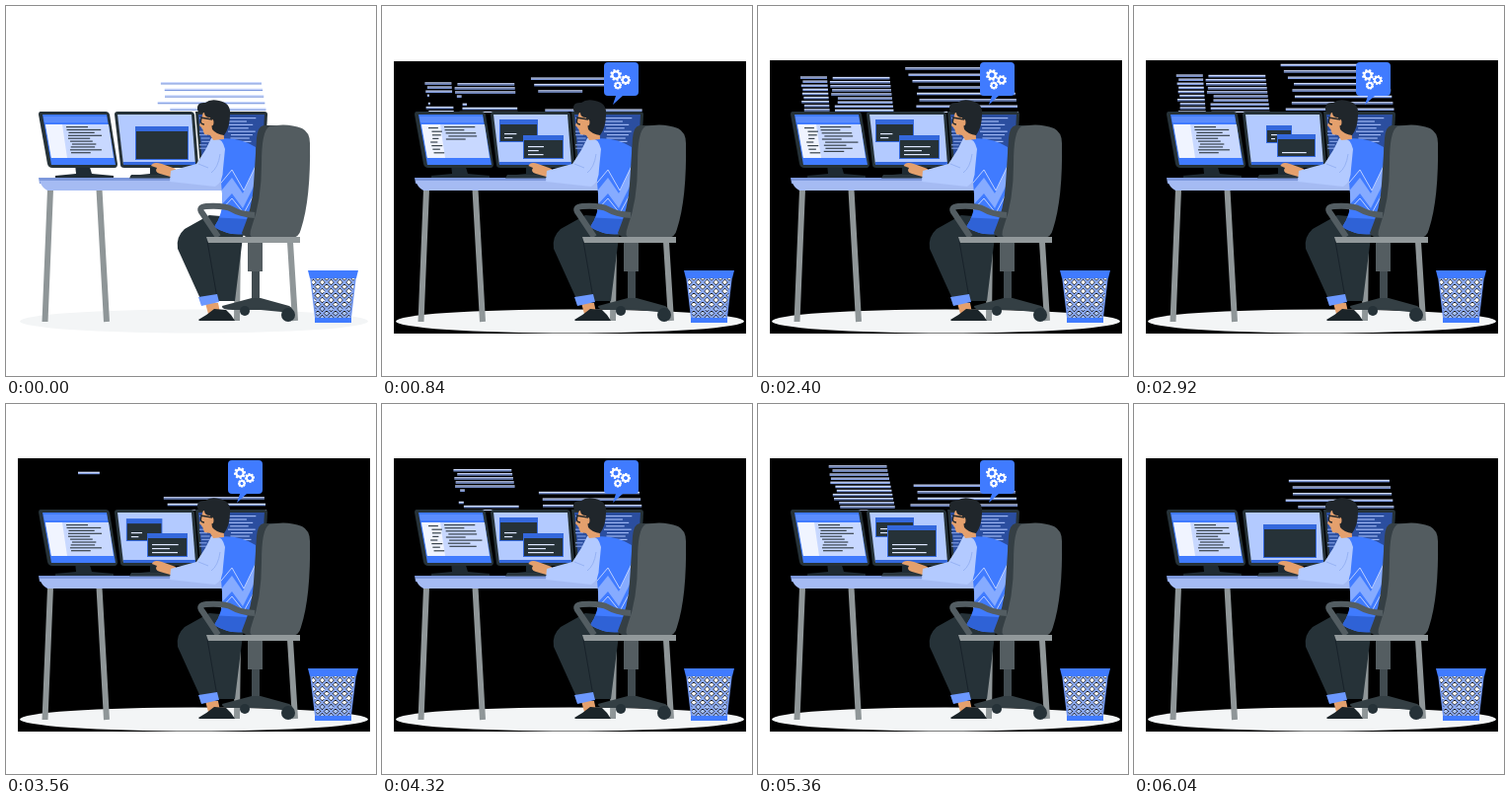
An HTML page with a canvas for the animation above (6.08 s loop, 375 by 375 pixels).

```html
<!DOCTYPE html>
<html lang="en">
<head>
<meta charset="utf-8">
<title>Programmer at a desk</title>
<style>
  html, body { margin: 0; width: 100%; height: 100%; overflow: hidden; background: #fff; }
  canvas { display: block; }
</style>
</head>
<body>
<canvas id="stage" width="375" height="375"></canvas>
<script>
const g = document.getElementById('stage').getContext('2d');
const LOOP = 6080, STEP = 40;
const BLUE = '#407bff', PALE = '#b3caff', DARK = '#263238', GREY = '#8f9698', SKIN = '#e4a06d';

const fill = (color, d) => { g.fillStyle = color; g.fill(new Path2D(d)); };
const line = (color, width, d) => {
  g.strokeStyle = color; g.lineWidth = width; g.stroke(new Path2D(d));
};
const box = (color, x, y, w, h) => { g.fillStyle = color; g.fillRect(x, y, w, h); };
const disc = (color, x, y, rx, ry = rx) => {
  g.fillStyle = color; g.beginPath(); g.ellipse(x, y, rx, ry, 0, 0, 7); g.fill();
};
const clamp = v => Math.max(0, Math.min(1, v));
const ease = v => { v = clamp(v); return v * v * (3 - 2 * v); };
const rnd = i => { const v = Math.sin(i * 12.9898 + 4) * 43758.5453; return v - Math.floor(v); };

// Eased interpolation through rows of [seconds, ...values]
function track(rows, t) {
  let i = 0;
  while (i < rows.length - 2 && t >= rows[i + 1][0]) i++;
  const [a, b] = [rows[i], rows[i + 1]];
  const k = ease((t - a[0]) / (b[0] - a[0]));
  return a.slice(1).map((v, j) => v + (b[j + 1] - v) * k);
}

function backdrop(t) {
  if (t < 0.04) return;
  const top = t < 0.64 ? 74 - 13 * t / 0.64 : t < 1.28 ? 56 : 55;
  box('#000', 12, top, 357, 332 - top);
}

// Rows rising from behind a monitor; they are typed from the top down and, half as fast, from row `low` up
function rising(x, w, top, gap, low, slant, seed, typed = 99) {
  g.save();
  g.beginPath(); g.rect(0, 0, 375, 108); g.clip();
  for (let i = 0, y = top; y < 108; i++, y += gap) {
    const grow = clamp(typed - Math.min(i, 2 * (low - 1 - i) + 1));
    const indent = w * 0.12 * rnd(seed + i);
    const len = (w - indent) * grow;
    if (len <= 0) continue;
    const left = x + (y - 60) * slant + indent;
    box('#cfdcff', left, y - 0.5, len, 1.3);
    box('#7f9be0', left, y + 0.8, len, 1.2);
  }
  g.restore();
}

function floatingCode(t) {
  const rise = 77.5 - 6.6 * t;
  if (t < 0.6) rising(146, 110, rise, 6.6, 5, 0.17, 3, 5 * (1 - ease((t - 0.2) / 0.4)));
  else if (t < 3.1) rising(146, 110, rise + 1, 6.4, 6, 0.17, 11, 1 + (t - 0.6) * 6);
  else rising(146, 110, 77 + 7 * (6.08 - t), 6.6, 6, 0.17, 3);
  if (t > 0.4 && t < 3.2) {
    const out = 1 - ease((t - 3) / 0.2);
    rising(41, 28 * out, 81 - 3.8 * t, 4.1, 7, 0.08, 21, (t - 0.4) * 7);
    rising(70, 62 * out, 82 - 4 * t, 4.1, 7, 0.12, 33, (t - 0.4) * 7);
  }
  if (t > 3.5 && t < 5.95) {
    const out = 1 - ease((t - 5.7) / 0.25);
    rising(69, 61 * out, 82 - 3.6 * t, 4.1, 11, 0.2, 47, (t - 3.5) * 6.2);
  }
}

function textRows(color, x, y, count, gap, w, seed, slant = 0) {
  for (let i = 0; i < count; i++) {
    box(color, x + i * gap * slant + (i % 4 ? 3 * rnd(seed + i) : 0), y + i * gap, w * (0.55 + 0.45 * rnd(seed + i + 9)), 1.2);
  }
}

function leftMonitor(t) {
  fill('#1f2b33', 'M70 160h14l3 10 22 2v3H50v-3l21-2z');
  fill(DARK, 'M35 107H101Q104 107 105 110L113 160Q113 164 110 164H47Q43 164 42 160L33 110Q33 107 35 107Z');
  fill(BLUE, 'M37 110H102L111 161H46Z');
  fill('#5b8dfc', 'M38 112H102L103 118H39Z');
  fill('#c8d8ff', 'M40 120H104L109 154H46Z');
  const wide = (t > 0.55 && t < 2.5) || (t > 3.6 && t < 5);
  fill('#f0f4ff', wide ? 'M40 120H59L64 154H46Z' : 'M40 120H57L62 154H46Z');
  if (wide) {
    textRows('#39444d', 47, 123, 8, 3.6, 11, 6, 0.15);
    const start = t < 3 ? 0.55 : 3.6;
    textRows('#39444d', 63, 122, Math.min(9, 4 + Math.floor((t - start) * 6)), 3.1, 34, 17, 0.15);
  } else {
    textRows('#39444d', 61, 122, 10, 2.9, 35, 60, 0.17);
  }
}

function codeWindow([x, y, w, h], rows, shown) {
  box('#3468dc', x, y, w, h);
  box(DARK, x + 1, y + 5, w - 2, h - 6);
  for (let i = 0; i < rows; i++) {
    box('#dfe8ff', x + 5, y + h - 5 - 4 * (rows - 1 - i), (w - 14) * (0.4 + 0.6 * rnd(i + 70)) * shown, 1.2);
  }
}

const BACK = [[0, 133, 123, 20, 16], [0.35, 133, 123, 20, 16], [0.75, 119, 115, 39, 23], [2.5, 119, 115, 39, 23],
  [2.88, 134, 121, 26, 18], [3.2, 134, 121, 26, 18], [3.7, 119, 115, 39, 24], [5, 119, 115, 39, 24],
  [5.5, 119, 115, 39, 19], [5.9, 134, 123, 20, 16], [6.08, 133, 123, 20, 16]];
const FRONT = [[0, 131, 122, 54, 34], [0.2, 131, 122, 54, 34], [0.7, 143, 131, 41, 24], [2.5, 143, 131, 41, 24],
  [2.9, 145, 130, 39, 23], [3.6, 143, 131, 41, 24], [4.9, 143, 131, 41, 24], [5.3, 131, 123, 50, 32],
  [5.7, 131, 123, 50, 32], [5.95, 131, 122, 54, 34], [6.08, 131, 122, 54, 34]];

function middleMonitor(t) {
  fill('#1f2b33', 'M146 160h18l2 10 12 2v3H126v-3l20-2z');
  fill(DARK, 'M113 107H187Q190 107 191 110L195 160Q195 164 192 164H120Q116 164 116 161L110 110Q110 107 113 107Z');
  fill(PALE, 'M113 110H188L192 161H119Z');
  codeWindow(track(BACK, t), 2, t > 0.7 && t < 5.6 ? 0.5 : 0);
  codeWindow(track(FRONT, t), t > 2.6 && t < 3.4 ? 1 : 3, t > 5.75 ? 0 : ease((t - 0.5) / 0.6));
  box('#3468dc', 119, 158, 73, 3);
}

function rightMonitor() {
  fill(DARK, 'M192 107H262Q265 107 265 110L262 164H197Z');
  fill('#2b4e9f', 'M195 110H262L259 161H199Z');
  textRows('#9db6f4', 225, 113, 10, 3.4, 32, 90);
  textRows('#7f9ce0', 196, 113, 10, 3.4, 9, 80);
}

function gear(x, y, r, turn) {
  g.save();
  g.translate(x, y); g.rotate(turn);
  g.fillStyle = '#fff';
  for (let i = 0; i < 8; i++) { g.rotate(Math.PI / 4); g.fillRect(-1.1, -r, 2.2, r * 0.55); }
  g.lineWidth = r * 0.36; g.strokeStyle = '#fff';
  g.beginPath(); g.arc(0, 0, r * 0.6, 0, 7); g.stroke();
  g.restore();
}

function bubble(t) {
  const s = ease((t - 0.3) / 0.4) * (1 - ease((t - 5.65) / 0.35));
  if (!s) return;
  g.save();
  g.translate(235, 100); g.scale(s, s); g.translate(-235, -100);
  fill(BLUE, 'M229 57H256Q260 57 260 61V87Q260 91 256 91H244L234 100 237 91H229Q225 91 225 87V61Q225 57 229 57Z');
  gear(237, 70, 6, t * 1.5);
  gear(247, 75, 5, -t * 1.8);
  gear(239, 80.5, 4, -t * 2);
  g.restore();
}

function desk() {
  line(GREY, 6, 'M45 186L39.5 320M94.5 186L102 320');
  fill('#7d98dc', 'M33 174H224V180H34Z');
  fill('#a5bbf3', 'M34 177H228V187H42Q36 184 34 177Z');
}

function basket() {
  g.save();
  g.clip(new Path2D('M309 276H354L349 318H314Z'));
  box('#fff', 305, 274, 52, 30);
  box('#a9c3ff', 305, 304, 52, 16);
  let d = '';
  for (let i = -60; i < 60; i += 9) d += `M${309 + i} 276l44 44M${353 + i} 276l-44 44`;
  line('#111', 3, d);
  line('#8eadf5', 1.9, d);
  g.restore();
  line('#6f95ee', 1.5, 'M309 276L314 318M354 276L349 318');
  fill(BLUE, 'M306 268H357L355 276H308ZM313 316H350V321H313Z');
}

function chairBase() {
  line(GREY, 6, 'M235 239L234 319M288 239L293 319');
  box('#545d61', 245, 238, 15, 31);
  box('#414b50', 249, 269, 8, 32);
  fill('#343f44', 'M249 296H258L287 304Q292 307 290 311L258 308H230Q218 308 219 304Z');
  disc(DARK, 286, 313, 7);
  disc(DARK, 242, 309, 5);
}

function legs() {
  fill(SKIN, 'M202 301L215 301 217 311 205 312Z');
  fill('#1b2429', 'M195 318Q204 313 211 307L223 308Q229 313 232 319H196Z');
  fill(DARK, 'M206 212L241 215Q245 226 240 234L232 299 198 299 174 246Q172 234 181 226Z');
  line('#18222a', 1, 'M204 238L214 296');
  fill('#6c98ff', 'M195 295L214 292 216 300 198 304Z');
}

function torso() {
  const vest = 'M214 135Q235 132 253 143L254 214 241 231Q226 233 211 224Q221 210 219 190Z';
  fill(BLUE, vest);
  g.save();
  g.clip(new Path2D(vest));
  fill('#86abff', 'M216 190L229 174 240 190 252 164V181L240 205 229 190 216 204Z');
  line('#cad9ff', 0.9, 'M214 184L229 166 241 187 254 160M216 209L229 195 241 210 254 186');
  fill('#2f62d6', 'M205 214L245 216V235H205Z');
  g.restore();
}

function arm(t) {
  const dx = 1.5 * Math.sin(t * 9);
  fill('#2a363d', 'M127 171H166V174.5H125Z');
  fill(SKIN, `M172 165L158 160Q${149 + dx} 157 ${147 + dx} 162L153 164Q150 168 156 170L170 174Z`);
  fill(PALE, 'M208 134Q219 132 222 145L220 165Q220 179 212 183L166 178 167 167 193 160 202 146Z');
  line('#8eabf0', 0.8, 'M217 150Q215 164 208 169M195 160L205 164');
}

function head() {
  fill(SKIN, 'M200 107L198 115 196 121 199 124 201 130 207 131 210 136 221 135 220 116 214 107Z');
  fill('#20262b', 'M194 105Q193 97 202 98Q207 94 216 96Q228 98 227 110Q227 123 221 131Q213 130 209 125L207 113Q201 113 201 108Q195 110 194 105Z');
  disc(SKIN, 208, 118, 2.5, 3.6);
  line('#20262b', 1.3, 'M197 113L209 115M198 114Q196 120 201 120');
}

function chairBack() {
  fill('#353f44', 'M261 121Q255 122 254 134L251 180Q250 204 239 230Q241 235 250 235H286Q272 180 274 121Z');
  fill('#535c60', 'M267 122Q285 118 300 124Q308 128 308 139Q309 195 299 226Q297 235 289 235H251Q245 234 249 224Q259 197 259 160Q259 126 267 122Z');
  line('#535d62', 6, 'M252 212Q237 211 229 206Q222 202 203 203Q194 204 199 210L215 234');
  fill('#92999b', 'M203 234H298V240H205Z');
}

function draw(t) {
  box('#fff', 0, 0, 375, 375);
  backdrop(t);
  disc('#f3f5f6', 190.5, 319.5, 176.5, 12);
  floatingCode(t);
  rightMonitor();
  leftMonitor(t);
  middleMonitor(t);
  bubble(t);
  desk();
  basket();
  chairBase();
  legs();
  torso();
  arm(t);
  head();
  chairBack();
}

g.lineJoin = 'round';
const start = performance.now();
function tick() {
  const ms = Math.max(0, performance.now() - start) % LOOP;
  draw(Math.floor(ms / STEP) * STEP / 1000);
  requestAnimationFrame(tick);
}
tick();
</script>
</body>
</html>
```
